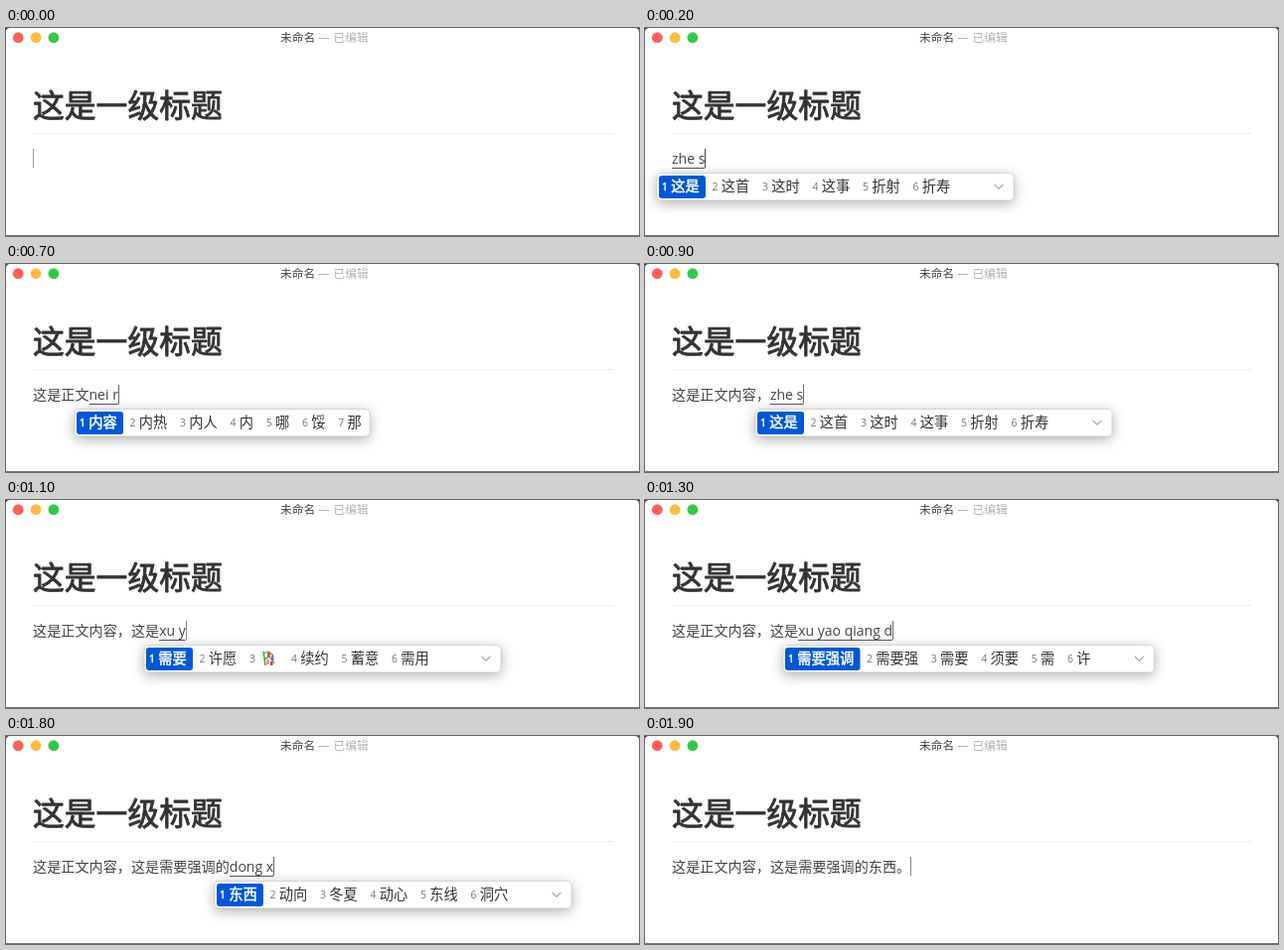
These frames come from a looping animation (637 by 210 pixels, 2000 ms). An HTML page with a canvas:

```html
<!DOCTYPE html>
<html lang="zh-CN">
<head>
<meta charset="utf-8">
<style>
html, body { margin: 0; width: 100%; height: 100%; overflow: hidden; background: #fff; }
canvas { display: block; width: 637px; height: 210px; }
</style>
</head>
<body>
<canvas></canvas>
<script>
const W = 637, H = 210, STEP = 100;
const FONT = '"Open Sans", "Noto Sans CJK SC", "Noto Sans CJK", sans-serif';
const canvas = document.querySelector('canvas');
const ctx = canvas.getContext('2d');
const ratio = window.devicePixelRatio || 1;
canvas.width = W * ratio;
canvas.height = H * ratio;

const FULL = '这是正文内容，这是需要强调的东西。';
const TREE = '*';   // stands for the bamboo symbol among the candidates

// One row per 100 ms: committed characters, pinyin, candidates ("+" = more), caret colour
const STEPS = [
  [0, '', '', '#999'],
  [0, 'zh', '这 着 中 之 只 种 正 者 +'],
  [0, 'zhe s', '这是 这首 这时 这事 折射 折寿 +', '#444'],
  [0, 'zhe shi z', '这是在 这是 这时 这事 折射 这 +'],
  [0, 'zhe shi zheng w', '这是正文 这是正 这是 这时 这事 这 +'],
  [4, '', '', '#777'],
  [4, 'ne', '呢 哪 讷 那 呐 内 疒 眲 抐'],
  [4, 'nei r', '内容 内热 内人 内 哪 馁 那'],
  [6, '', ''],
  [7, 'zhe s', '这是 这首 这时 这事 折射 折寿 +'],
  [9, '', ''],
  [9, 'xu y', '需要 许愿 * 续约 蓄意 需用 +', '#888'],
  [9, 'xu yao q', '需要 需要去 需求 须要 许 需 +'],
  [9, 'xu yao qiang d', '需要强调 需要强 需要 须要 需 许 +'],
  [13, '', ''],
  [13, 'de', '的 得 地 德 嘚 锝 底 +'],
  [14, '', '', '#222'],
  [14, 'dong', '动 东 懂 洞 冬 冻 栋 董 +'],
  [14, 'dong x', '东西 动向 冬夏 动心 东线 洞穴 +'],
  [17, '', '', '#888']
];

function text(str, x, y, size, color, bold = 0) {
  ctx.font = `${size}px ${FONT}`;
  ctx.fillStyle = ctx.strokeStyle = color;
  ctx.fillText(str, x, y);
  if (bold) {
    ctx.lineWidth = bold;
    ctx.lineJoin = 'round';
    ctx.strokeText(str, x, y);
  }
  return ctx.measureText(str).width;
}

function rect(x, y, w, h, color) {
  ctx.fillStyle = color;
  ctx.fillRect(x, y, w, h);
}

function roundRect(x, y, w, h, r, color) {
  ctx.beginPath();
  ctx.roundRect(x, y, w, h, r);
  ctx.fillStyle = color;
  ctx.fill();
}

function line(points, color, width) {
  ctx.beginPath();
  points.forEach(([x, y]) => ctx.lineTo(x, y));
  ctx.strokeStyle = color;
  ctx.lineWidth = width;
  ctx.stroke();
}

function dot(x, y, color) {
  ctx.beginPath();
  ctx.arc(x, y, 5.4, 0, Math.PI * 2);
  ctx.fillStyle = color;
  ctx.fill();
}

function drawWindow() {
  rect(0, 0, W, H, '#333');
  roundRect(0, 0, W, H, [4, 4, 0, 0], '#fff');
  rect(0, 209, W, 1, '#777');
  ['#fc605c', '#fdbc40', '#34c84a'].forEach((c, i) => dot(12.3 + 17.8 * i, 9.7, c));
  text('未命名', 276, 14.3, 11.7, '#444');
  text('—', 314, 14.3, 11.7, '#b0b0b0');
  text('已编辑', 329.5, 14.3, 11.7, '#b0b0b0');
  text('这是一级标题', 27, 90.4, 31.8, '#333', 0.9);
  rect(27, 106, 584, 1, '#eee');
}

function drawTree(x) {
  line([[x + 3, 153], [x + 5, 167]], '#58a545', 1.6);
  line([[x + 3, 155], [x + 8, 153], [x + 13, 157]], '#58a545', 1.3);
  line([[x + 4, 161], [x + 9, 158], [x + 14, 165]], '#6b7d48', 1.2);
  rect(x + 7, 154, 3, 5, '#d9574a');
  rect(x + 11, 157, 2.5, 5, '#5c87b8');
  rect(x + 6, 161, 3, 5, '#e3a09a');
  rect(x + 10, 163, 2.5, 4, '#c9473f');
}

const itemWidth = s => s === TREE ? 42 : 22 + 14.25 * s.length;

function drawCandidates(left, list) {
  const items = list.split(' ');
  const more = items[items.length - 1] === '+';
  if (more) items.pop();
  const end = items.reduce((sum, s) => sum + itemWidth(s), 5);
  const width = more ? Math.max(359, end + 51) : end - 4.5;

  ctx.save();
  ctx.shadowColor = 'rgba(0,0,0,.32)';
  ctx.shadowBlur = 13 * ratio;
  ctx.shadowOffsetY = 3 * ratio;
  roundRect(left, 146.5, width, 27.5, 4, '#fff');
  ctx.restore();
  ctx.strokeStyle = '#c4c4c4';
  ctx.lineWidth = 0.6;
  ctx.stroke();

  roundRect(left + 2, 149, itemWidth(items[0]) - 3.5, 23, 3, '#0058d8');
  let x = left + 5;
  items.forEach((s, i) => {
    const first = i === 0;
    text(i + 1, x, 164.3, 10.5, first ? '#fff' : '#777', first ? 0.5 : 0);
    if (s === TREE) drawTree(x + 11);
    else text(s, x + 9.3, 165.3, 14.25, first ? '#fff' : '#333', first ? 0.5 : 0);
    x += itemWidth(s);
  });
  if (more) {
    const c = left + width - 15;
    line([[c - 4.5, 158], [c, 162.3], [c + 4.5, 158]], '#777', 1);
  }
}

function drawStep([count, pinyin, candidates, caret = '#666']) {
  ctx.setTransform(ratio, 0, 0, ratio, 0, 0);
  drawWindow();
  const size = 14.13, start = 27 + count * size;
  text(FULL.slice(0, count), 27, 137.2, size, '#444');
  let end = start;
  if (pinyin) {
    end += text(pinyin, start, 137.2, 14, '#444');
    rect(Math.round(start), 141, end - start, 1, '#555');
    drawCandidates(Math.round(start) - 15, candidates);
  }
  rect(Math.round(end - 0.2), 122, 1, 19, caret);
}

let began;
function tick(now) {
  began ??= now;
  drawStep(STEPS[Math.floor((now - began) / STEP) % STEPS.length]);
  requestAnimationFrame(tick);
}
drawStep(STEPS[0]);
requestAnimationFrame(tick);
</script>
</body>
</html>
```
